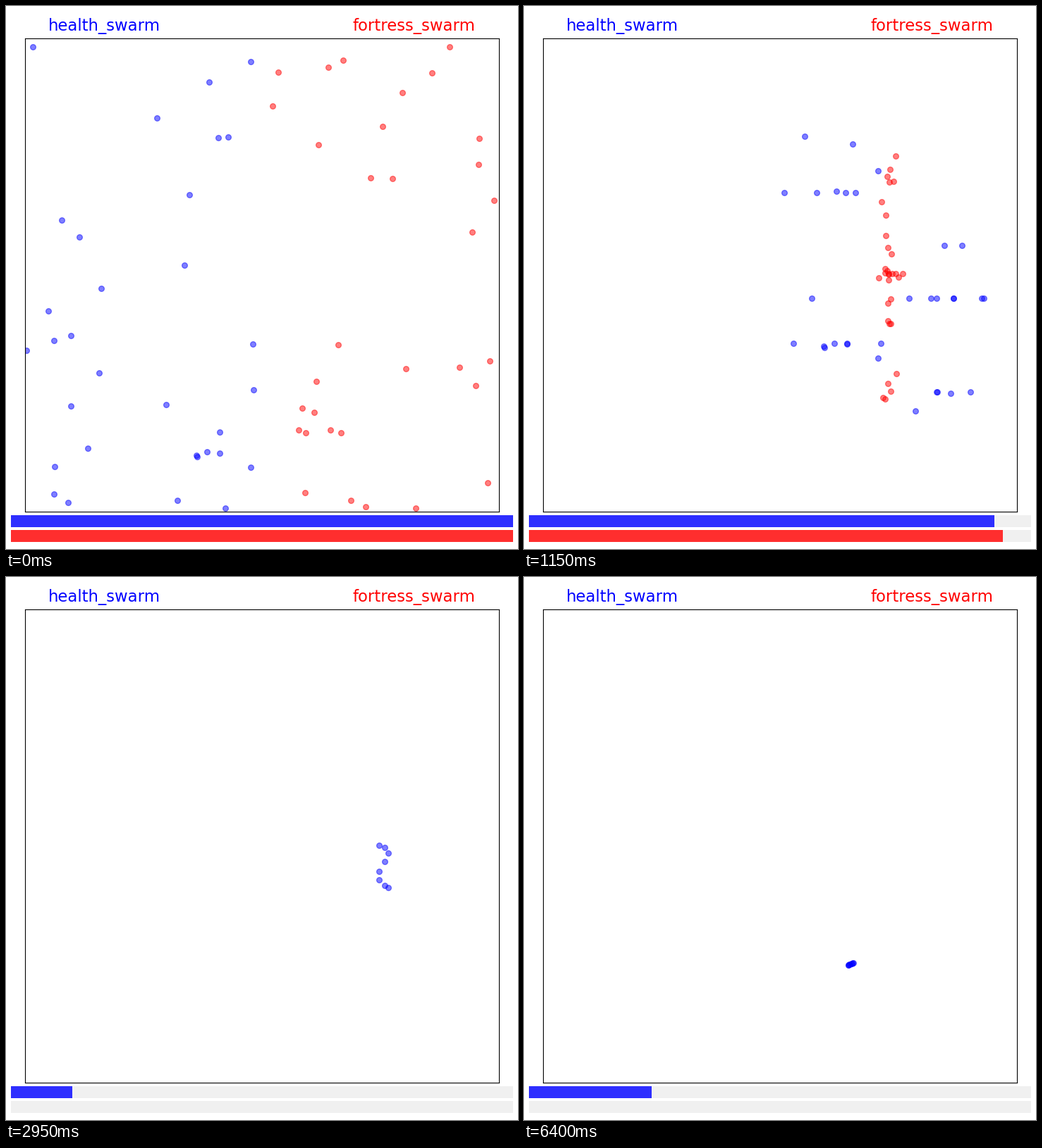
A matplotlib script that plays this animation: 726x771 px, repeating every 6450 ms.

```python
import numpy as np
import matplotlib.pyplot as plt
from matplotlib.animation import FuncAnimation
from matplotlib.patches import Rectangle

W, H, DPI = 726, 771, 100
FRAMES, INTERVAL = 129, 50
LEFT, TOP, SIDE = 27, 46, 672
SPEED = SIDE / 100
MEET, CLASH, CALM = 14, 33, 59
ORIGIN = np.array([LEFT, TOP])
RED_HOME, HUB = np.array([532, 396]), np.array([517, 381])

# Starting places, the longest living first.
BLUE = np.array([
    (132, 521), (135, 401), (79, 304), (116, 628), (214, 159), (243, 702),
    (311, 713), (88, 705), (260, 268), (288, 108), (253, 368), (227, 566),
    (285, 633), (303, 635), (104, 328), (92, 468), (92, 568), (270, 638),
    (68, 693), (69, 654), (347, 655), (347, 79), (301, 187), (315, 186),
    (350, 480), (351, 545), (303, 605), (271, 640), (60, 433), (68, 475),
    (29, 489), (38, 58)])
RED = np.array([
    (629, 58), (478, 77), (457, 87), (562, 123), (378, 142), (683, 677),
    (424, 691), (471, 481), (692, 276), (661, 321), (666, 539), (420, 571),
    (437, 577), (440, 533), (671, 188), (534, 171), (443, 197), (670, 225),
    (517, 244), (548, 245), (686, 504), (643, 513), (567, 515), (386, 94),
    (604, 95), (415, 602), (425, 606), (460, 602), (475, 606), (489, 702),
    (510, 711), (581, 713)])
BLUE_LEFT, BLUE_LATE, RED_LATE = 8, 21, 23

# Survivors' path: time, centre x and y, wave, spread in x and y.
ROAM = np.array([
    (59, 535, 411, 7, 0, -30), (83, 505, 550, 0, 10, -8.5),
    (91, 496, 591, 0, 10, -7), (106.5, 485, 695, 0, 6, -1),
    (110, 469, 671, 0, 4.5, -1), (117, 474, 624, 0, 5, -2),
    (128, 463, 549.5, 0, 3.5, -1.5)]).T

# Health bar right ends over time.
BLUE_BAR = [16, 26, 33, 39, 51, 59, 83, 110, 128], [719, 645, 361, 225, 80, 94, 137, 171, 181]
RED_BAR = [16, 26, 33, 39, 52, 54], [719, 662, 323, 118, 15, 7]


def gap(a, b):
    """Shortest way from a to b across the wrapping edges."""
    return (b - a + SIDE / 2) % SIDE - SIDE / 2


def wrap(p):
    return ORIGIN + (p - ORIGIN) % SIDE


def chase(a, b, steps):
    reach = SPEED * max(steps, 0)
    return wrap(a + np.clip(gap(a, b), -reach, reach))


def lost(n, first, last, power, seed):
    times = first + (last - first) * np.linspace(0, 1, n) ** power
    return np.random.default_rng(seed).permutation(np.ceil(times))


def lanes(p):
    """Rows the blue swarm lines up on; each side of the board has its own."""
    x, y = p.T
    y = np.where(y < 100, y + SIDE, y)
    outer = np.select([y < 365, y < 598], [340, 440], 608)
    inner = np.where((y > 354) & (y < 690), 539, 205)
    row = np.where(gap(x, HUB[0]) < 0, outer, inner)
    return np.column_stack([np.full(len(p), HUB[0]), row])


def roam(f):
    cx, cy, wave, dx, dy = (np.interp(f, ROAM[0], row) for row in ROAM[1:])
    i = np.arange(BLUE_LEFT)
    spread = np.cos(np.pi * i / (BLUE_LEFT - 1))
    ripple = np.cos(2 * np.pi * (i - 2) / 5)
    return np.column_stack([cx + dx * spread + wave * ripple, cy + dy * spread])


rng = np.random.default_rng(3)
scatter = rng.normal(0, 1, RED.shape)
BLUE_LANES = lanes(BLUE)
BLUE_END = np.concatenate([np.full(BLUE_LEFT, FRAMES),
                           lost(BLUE_LATE - BLUE_LEFT, 34, 51, 1.2, 4),
                           lost(len(BLUE) - BLUE_LATE, 22, 33, 0.8, 7)])
RED_END = np.concatenate([lost(RED_LATE, 34, 53, 1.5, 2),
                          lost(len(RED) - RED_LATE, 23, 33, 0.8, 5)])


def blue_at(f):
    p = chase(BLUE, BLUE_LANES, min(f, MEET))
    ring = np.column_stack([np.full(len(p), HUB[0]), np.clip(p[:, 1], 295, 415)])
    p = chase(p, ring, min(f, CLASH) - MEET)
    p[BLUE_LEFT:] = chase(p[BLUE_LEFT:], HUB, f - CLASH)
    if f > CLASH:
        t = min((f - CLASH) / (CALM - CLASH), 1)
        p[:BLUE_LEFT] += gap(p[:BLUE_LEFT], roam(f)) * t
    return p[f < BLUE_END]


def red_at(f):
    p = chase(RED, RED_HOME + 9 * scatter, min(f, MEET))
    p = chase(p, HUB + 5 * scatter, f - MEET)
    return p[f < RED_END]


fig = plt.figure(figsize=(W / DPI, H / DPI), dpi=DPI, facecolor="white")

page = fig.add_axes([0, 0, 1, 1])
page.set(xlim=(0, W), ylim=(H, 0))
page.axis("off")


def title(x, text, color):
    page.text(x, 35, text, color=color, fontsize=16.4, family="DejaVu Sans",
              ha="center", va="baseline")


def bar(y, color):
    for shade in ("#f0f0f0", color):
        patch = page.add_patch(Rectangle((7, y), 712, 17, fc=shade, lw=0))
    return patch


title(139.5, "health_swarm", "blue")
title(578.2, "fortress_swarm", "red")
blue_bar = bar(723, "#2e2eff")
red_bar = bar(744, "#ff2e2e")

arena = fig.add_axes([LEFT / W, 1 - (TOP + SIDE) / H, SIDE / W, SIDE / H])
arena.set(xlim=(LEFT, LEFT + SIDE), ylim=(TOP + SIDE, TOP), xticks=[], yticks=[])


def dots(color):
    return arena.scatter([], [], s=31, c=color, alpha=0.5, linewidths=0.9)


blue_dots, red_dots = dots("blue"), dots("red")


def update(f):
    blue_dots.set_offsets(blue_at(f))
    red_dots.set_offsets(red_at(f))
    blue_bar.set_width(np.interp(f, *BLUE_BAR) - 7)
    red_bar.set_width(np.interp(f, *RED_BAR) - 7)
    return blue_dots, red_dots, blue_bar, red_bar


anim = FuncAnimation(fig, update, frames=FRAMES, interval=INTERVAL,
                     repeat=True, repeat_delay=0, blit=False)
plt.show()
```
